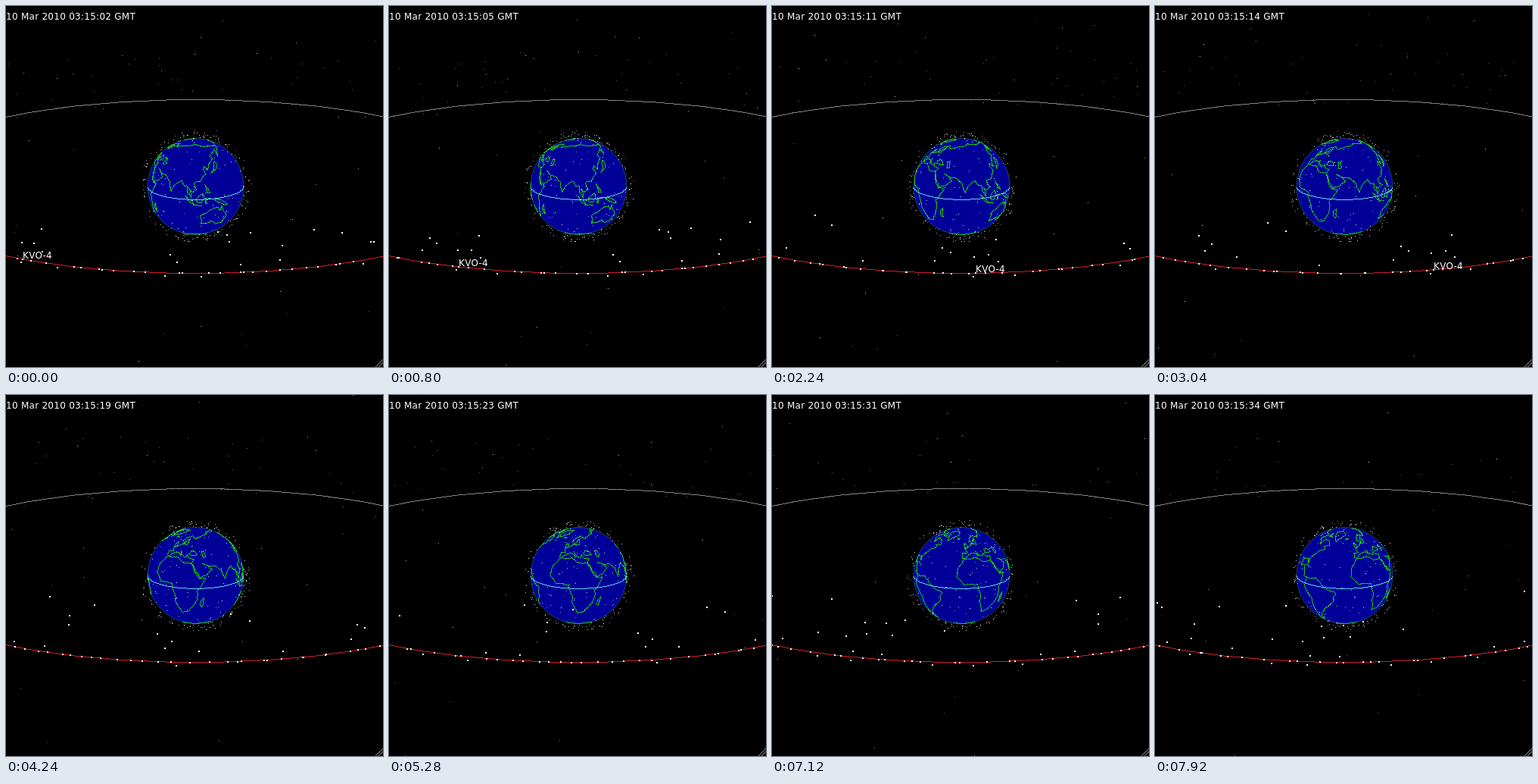
These frames come from a looping animation (498x476 px, 8 s). An HTML page with a canvas:

```html
<!DOCTYPE html>
<html lang="en">
<head>
<meta charset="utf-8">
<title>Satellites around the Earth</title>
<style>
html, body { margin: 0; width: 100%; height: 100%; overflow: hidden; background: #000; }
canvas { display: block; width: 498px; height: 476px; }
</style>
</head>
<body>
<canvas id="stage" width="498" height="476"></canvas>
<script>
const ctx = document.getElementById("stage").getContext("2d");
const W = 498, H = 476, CX = 250.5, CY = 238, R = 63.5, GEO = 420;
const SIN = 0.2728, COS = Math.sqrt(1 - SIN * SIN), RAD = Math.PI / 180;
const STEP = 80, LOOP = 8000;
const START_LON = 108.1, DEG_PER_SEC = 4.2, CLOCK_START = 2.8;
const TAGGED = { name: "KVO-4", lon: 75.2 };

function seeded(seed) {
  return () => (seed = (seed * 16807) % 2147483647) / 2147483647;
}
const rnd = seeded(4217);
const many = (n, make) => Array.from({ length: n }, (_, i) => make(i));

// Degrees the view has turned: a slow start, then a steady rate
const turned = step => 1.08 * Math.min(step, 10) + 1.367 * Math.max(step - 10, 0);

function project([lon, lat], r, mid) {
  const a = (lon - mid) * RAD, b = lat * RAD;
  const c = Math.cos(b) * Math.cos(a), s = Math.sin(b);
  return {
    x: CX + r * Math.cos(b) * Math.sin(a),
    y: CY + r * (c * SIN - s * COS),
    z: c * COS + s * SIN
  };
}

// Roughen the stretch from a to b by shifting midpoints sideways
function rough(a, b, out) {
  const dx = b[0] - a[0], dy = b[1] - a[1], len = Math.hypot(dx, dy);
  if (len < 3.5) return out.push(b);
  const k = (rnd() - 0.5) * Math.min(0.2, 2.5 / len);
  const m = [a[0] + dx / 2 - dy * k, a[1] + dy / 2 + dx * k];
  rough(a, m, out);
  rough(m, b, out);
}

const coasts = [];
function coast(...nums) {
  const pts = many(nums.length / 2, i => [nums[2 * i], nums[2 * i + 1]]);
  const line = [pts[0]];
  for (let i = 1; i < pts.length; i++) rough(pts[i - 1], pts[i], line);
  coasts.push(line);
}
const island = (...nums) => coast(...nums, nums[0], nums[1]);

// Key points of the coasts: lon, lat
// Africa
island(-6,36, 10,37, 20,31, 32,31, 37,21, 43,12, 51,12, 40,-3, 40,-15, 35,-24, 28,-33, 19,-35, 12,-17,
  13,-9, 9,0, 9,4, -8,4.5, -17,14, -16,22, -10,31);
island(49,-12, 47,-25, 44,-22, 45,-16);
// Southern Asia to the Bering Strait
coast(33,30, 44,13, 52,16, 60,22, 56,26, 48,30, 57,26, 67,25, 73,20, 77,8, 80,15, 90,22, 94,16, 98,16,
  99,8, 103,2, 100,13, 105,9, 109,12, 106,20, 114,22, 122,30, 119,36, 121,40, 126,35, 128,40, 140,50,
  138,54, 155,59, 163,62, 156,52, 164,58, 180,63, 190,66);
// Arctic Asia and Europe
coast(190,66, 160,70, 128,72, 104,77, 73,72, 44,68, 40,65, 28,71, 14,67, 6,60, 11,59, 14,56, 18,62,
  24,65, 22,60, 21,55, 10,57, 8,54, -4,48, -1,44, -9,43, -9,37, -5,36, 3,42, 10,43, 16,38, 13,45,
  22,37, 25,41, 28,37, 36,36, 33,30);
island(28,42, 41,41, 37,46, 31,46);
island(50,37, 54,38, 52,46, 48,45);
island(-5,50, 1,52, -3,58, -5,54);
island(-22,64, -14,65, -20,66);
island(-45,60, -54,68, -68,77, -33,83, -20,75, -40,65);
// Islands of Asia
island(95,5, 104,-2, 106,-6, 100,-2);
coast(105,-7, 115,-8);
island(109,1, 117,7, 118,1, 115,-4, 110,-3);
island(120,-5, 120,1, 125,1, 121,-1, 122,-5);
island(131,-1, 141,-3, 150,-10, 143,-9, 138,-6);
island(120,18, 122,14, 126,7, 122,8, 121,14);
island(130,31, 136,36, 141,45, 144,43, 141,36);
// Australia, Antarctica
island(114,-22, 122,-18, 131,-12, 137,-12, 140,-17, 142,-11, 146,-19, 153,-26, 150,-37, 140,-38,
  131,-32, 116,-35);
coast(0,-69, 120,-66, 240,-75, 360,-69);
// Americas
coast(-166,68, -128,70, -95,69, -82,68, -94,59, -82,55, -79,52, -77,61, -65,60, -56,52, -66,50, -61,46,
  -70,43, -76,36, -81,31, -80,25, -84,30, -97,28, -95,18, -88,21, -84,15, -83,9, -77,8);
island(-80,73, -62,66, -74,66);
coast(-84,22, -74,20);
island(-77,8, -62,10, -50,0, -35,-6, -39,-18, -48,-26, -58,-36, -66,-45, -68,-54, -74,-51, -72,-30,
  -70,-18, -81,-5);

// Evenly spread latitudes, or those of a circular orbit
const anyLat = () => Math.asin(rnd() * 1.8 - 0.9) / RAD;
const orbitLat = inc => Math.asin(Math.sin(inc * RAD) * Math.sin(rnd() * 2 * Math.PI)) / RAD;
const sat = (lon, lat, r, tone, size = 1) => ({ pos: [lon, lat], r, tone, size });
const gray = (lo, hi) => Math.round(lo + rnd() * (hi - lo));

const sats = [
  ...many(70, () => sat(rnd() * 360, anyLat(), 255 + rnd() * 240, gray(70, 220))),
  ...many(290, () => sat(rnd() * 360, orbitLat(rnd() < 0.65 ? 82 : 55 + rnd() * 20),
    R * (1.05 + 0.12 * rnd()), gray(110, 255))),
  ...many(155, i => sat(i * 360 / 155 + rnd() * 3, rnd() < 0.12 ? -0.6 : 0, GEO, 255, 2)),
  ...many(95, () => sat(rnd() * 360, 1 + 10 * rnd() ** 1.5, GEO, 255, 2)),
  sat(TAGGED.lon, 0, GEO, 255, 2)
];

// Hard-edged one-pixel line
function line(a, b) {
  const n = Math.max(1, Math.ceil(Math.max(Math.abs(b.x - a.x), Math.abs(b.y - a.y))));
  for (let i = 0; i <= n; i++) {
    ctx.fillRect(Math.floor(a.x + (b.x - a.x) * i / n), Math.floor(a.y + (b.y - a.y) * i / n), 1, 1);
  }
}

// Half of a tilted circle, drawn in straight nine-degree pieces
function halfRing(r, front, color) {
  const at = deg => ({ x: CX + r * Math.sin(deg * RAD), y: CY + front * r * SIN * Math.cos(deg * RAD) });
  ctx.fillStyle = color;
  for (let d = -85.5; d < 85; d += 9) line(at(d), at(d + 9));
}

function drawEarth(mid) {
  ctx.beginPath();
  ctx.arc(CX, CY, R, 0, 2 * Math.PI);
  ctx.fillStyle = "#000098";
  ctx.fill();
  ctx.strokeStyle = "rgba(60,165,150,.4)";
  ctx.stroke();
  ctx.fillStyle = "#1cc41c";
  for (const pts of coasts) {
    const seen = pts.map(p => project(p, R, mid));
    for (let i = 1; i < seen.length; i++) {
      if (seen[i - 1].z > 0 && seen[i].z > 0) line(seen[i - 1], seen[i]);
    }
  }
  halfRing(R, 1, "#62d2ee");
}

function drawSat({ pos, r, tone, size }, mid) {
  const p = project(pos, r, mid), back = p.z < 0;
  if (back && Math.hypot(p.x - CX, p.y - CY) < R) return;
  const dim = back && size > 1;
  const s = dim ? 1 : size, t = dim ? 95 : tone;
  ctx.fillStyle = `rgb(${t},${t},${t})`;
  ctx.fillRect(Math.round(p.x - s / 2), Math.round(p.y - s / 2), s, s);
}

function drawText(mid) {
  ctx.fillStyle = "#fff";
  ctx.font = '12px "DejaVu Sans", sans-serif';
  ctx.letterSpacing = "0.27px";
  const tag = project([TAGGED.lon, 0], GEO, mid);
  ctx.fillText(TAGGED.name, Math.round(tag.x), Math.round(tag.y) - 1);
  const sec = Math.floor(CLOCK_START + (START_LON - mid) / DEG_PER_SEC);
  ctx.fillText(`10 Mar 2010 03:15:${String(sec).padStart(2, "0")} GMT`, 0, 18);
}

function draw(step) {
  const mid = START_LON - turned(step);
  ctx.fillStyle = "#000";
  ctx.fillRect(0, 0, W, H);
  halfRing(GEO, -1, "#858585");
  drawEarth(mid);
  halfRing(GEO, 1, "#d01c28");
  for (const s of sats) drawSat(s, mid);
  drawText(mid);
  ctx.fillStyle = "#999";
  for (const d of [10, 6]) line({ x: W - d, y: H - 1 }, { x: W - 1, y: H - d });
}

function tick() {
  draw(Math.floor((performance.now() % LOOP) / STEP));
  requestAnimationFrame(tick);
}
tick();
</script>
</body>
</html>
```
